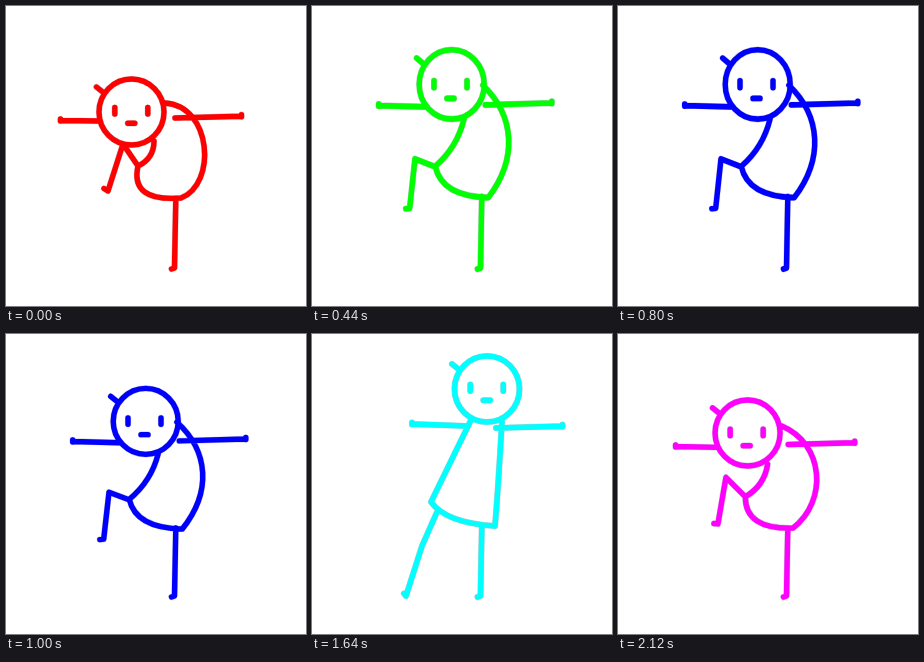
An HTML page for the animation above (2.16 s loop, 300 px wide and 300 px high).

```html
<!DOCTYPE html>
<html lang="en">
<head>
<meta charset="utf-8">
<title>Dancing doodle</title>
<style>
  html, body { margin: 0; width: 100%; height: 100%; overflow: hidden; background: #fff; }
  svg { display: block; width: 100%; height: 100%; }
  path { fill: none; stroke-linecap: round; stroke-linejoin: round; }
  #edge { stroke: #667; stroke-width: 6.2; opacity: .35; }
  #ink { stroke-width: 5.4; }
</style>
</head>
<body>
<svg viewBox="0 0 300 300"><path id="edge"/><path id="ink"/></svg>
<script>
const STEP = 40, BEAT = 9, GROUND = 262;
const COLORS = ['#f00', '#0f0', '#00f', '#ff0', '#0ff', '#f0f'];

const add = ([x, y], dx, dy) => [x + dx, y + dy];
const line = (...points) => 'M' + points.join('L');
const hand = ([x, y]) => `M${x} ${y - 1.5}v2`;

// Outline of the figure, from crouching (rise 0) to upright (rise 1).
function figure(rise) {
  const ease = rise ** 1.8;
  const swing = Math.sin(Math.PI * rise);
  const late = rise ** 4;
  const joint = (from, to, bow = [0, 0]) =>
    from.map((v, i) => v + (to[i] - v) * ease + bow[i] * swing);

  const head = joint([125.5, 106], [175, 55], [0, -4]);
  const face = add(head, -0.2 - swing, -1.5 + swing);
  const mouth = add(face, 0, 12.8 + swing);

  const rightArm = joint([169, 112], [184, 94]);
  const rightHand = add(rightArm, 66.5, -1.8);
  const leftHand = [head[0] - 71 - 4 * rise, 114.5 - 24.5 * ease];
  const leftArm = add(leftHand, 37.5 + 17 * rise, 0.5 + 1.5 * rise);

  const neck = joint([148, 135], [159, 86], [1, -1]);
  const nape = joint([159, 97], [190, 87], [3, -6]);
  const upperBack = joint([206, 100], [188, 122], [2, 11]);
  const lowerBack = joint([211, 178], [186, 157], [2, -14]);
  const rear = joint([175, 192], [183, 192], [-1, 3]);
  const hem = joint([124, 196], [134, 189], [3, 0]);
  const hip = joint([132, 160], [119, 168], [-5, 3]);
  const belly = add(hip.map((v, i) => (v + neck[i]) / 2), 8 * (1 - late), 5 * (1 - late));

  const thigh = add(hip, 6 * late, 10 * late);
  const knee = joint([117, 138], [110, 212], [-12, -1]);
  const foot = joint([102, 185], [94, 262], [-2, -2]);
  const toe = add(foot, -4 + 2 * late, -2.5 + 3 * swing);

  return [
    `M${add(head, -32.5, 0)}a32.5 33 0 1 0 65 0a32.5 33 0 1 0-65 0`,
    `M${add(face, -16.5, -3)}v6.5`,
    `M${add(face, 16.5, -3)}v6.5`,
    `M${add(mouth, -3.5, 0)}h7`,
    `M${add(head, -35, -25)}l7.5 6`,
    line(leftHand, leftArm), hand(leftHand),
    line(rightArm, rightHand), hand(rightHand),
    `M${nape}C${upperBack} ${lowerBack} ${rear}Q${hem} ${hip}Q${belly} ${neck}`,
    line(thigh, knee, foot, toe),
    `M169.8 194L168.5 ${GROUND}l-3 1`
  ].join('');
}

const edge = document.getElementById('edge');
const ink = document.getElementById('ink');

function draw(time) {
  const tick = Math.floor(time / STEP) % (BEAT * COLORS.length);
  const phase = tick % BEAT;
  const rise = Math.min(phase, BEAT - phase) / 4;
  // On the way up the figure stretches away from the ground.
  const stretch = 1 + 0.052 * Math.max(0, Math.sin(2 * Math.PI * phase / BEAT));
  const shape = figure(rise);
  for (const part of [edge, ink]) {
    part.setAttribute('d', shape);
    part.setAttribute('transform', `translate(0 ${GROUND * (1 - stretch)}) scale(1 ${stretch})`);
  }
  ink.style.stroke = COLORS[Math.floor(tick / BEAT)];
}

const start = performance.now();
function loop() {
  draw(performance.now() - start);
  requestAnimationFrame(loop);
}
loop();
</script>
</body>
</html>
```
